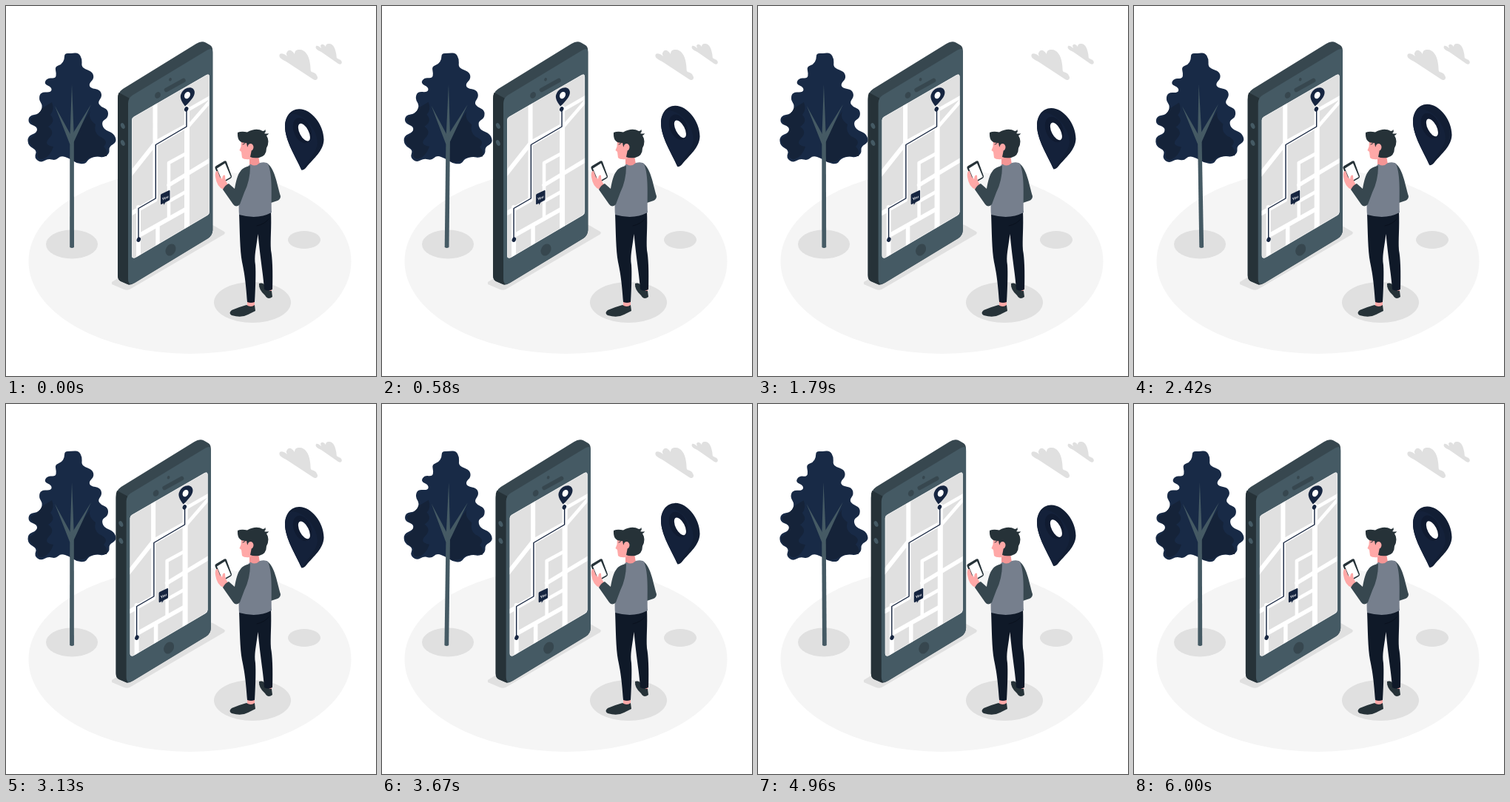
These frames come from a looping animation (500x500 px, 6040 ms). An HTML page with a canvas:

```html
<!DOCTYPE html>
<html lang="en">
<head>
<meta charset="utf-8">
<title>Navigation</title>
<style>
html, body { margin: 0; width: 100%; height: 100%; overflow: hidden; background: #fff; }
canvas { display: block; width: 500px; height: 500px; }
</style>
</head>
<body>
<canvas id="stage"></canvas>
<script>
const canvas = document.getElementById('stage');
const ctx = canvas.getContext('2d');
const ratio = window.devicePixelRatio || 1;
canvas.width = canvas.height = 500 * ratio;

const LOOP = 6040;
const NAVY = '#162540', SLATE = '#455a64', STEEL = '#37474f', INK = '#263238';
const GREY = '#e0e0e0', SKIN = '#ffa8a7';

function fill(d, color) {
  ctx.fillStyle = color;
  ctx.fill(new Path2D(d));
}

function line(d, color, width) {
  ctx.strokeStyle = color;
  ctx.lineWidth = width;
  ctx.stroke(new Path2D(d));
}

function oval(x, y, rx, ry, color, turn = 0) {
  ctx.fillStyle = color;
  ctx.beginPath();
  ctx.ellipse(x, y, rx, ry, turn, 0, Math.PI * 2);
  ctx.fill();
}

// Closed smooth outline through the midpoints of a flat x, y list.
function blob(p, color) {
  const n = p.length / 2;
  const at = i => [p[(i % n) * 2], p[(i % n) * 2 + 1]];
  const mid = i => {
    const a = at(i), b = at(i + 1);
    return [(a[0] + b[0]) / 2, (a[1] + b[1]) / 2];
  };
  ctx.fillStyle = color;
  ctx.beginPath();
  ctx.moveTo(...mid(0));
  for (let i = 1; i <= n; i++) ctx.quadraticCurveTo(...at(i), ...mid(i));
  ctx.fill();
}

// cubic-bezier(.42, 0, 1, 1)
function easeIn(x) {
  let lo = 0, hi = 1;
  for (let i = 0; i < 24; i++) {
    const t = (lo + hi) / 2, u = 1 - t;
    if (1.26 * u * u * t + 3 * u * t * t + t * t * t < x) lo = t; else hi = t;
  }
  return 3 * lo * lo - 2 * lo * lo * lo;
}

// Keys are [position, value] pairs; easing restarts on every segment.
function tween(keys, p) {
  let i = 1;
  while (i < keys.length - 1 && p > keys[i][0]) i++;
  const [a, from] = keys[i - 1], [b, to] = keys[i];
  return from + (to - from) * easeIn((p - a) / (b - a));
}

const SWAY = [[0, 0], [.25, 1], [.75, -1], [1, 0]];
const HOVER = [[0, -.3], [.5, -7.1], [1, -.3]];
const SHAKE = [0, -1, 2, -2.7, 2.7, -2.7, 2.7, -2.7, 2, -1, 0].map((v, i) => [i / 10, v]);

const CROWN = [
  79, 72, 79, 64, 88, 64, 98, 63, 103, 72, 102, 81, 106, 85, 117, 89, 119, 98,
  112, 105, 114, 111, 127, 113, 130, 122, 124, 130, 128, 136, 138, 140, 138, 151,
  129, 156, 132, 167, 146, 172, 150, 184, 139, 190, 140, 199, 132, 205, 123, 203,
  112, 206, 107, 214, 94, 212, 86, 206, 74, 202, 67, 209, 57, 206, 47, 212, 38, 205,
  42, 195, 30, 189, 29, 176, 42, 171, 42, 163, 30, 159, 31, 148, 45, 146, 50, 135,
  44, 126, 47, 116, 61, 117, 62, 110, 51, 105, 56, 97, 67, 98, 68, 91, 66, 82, 75, 79
];

function drawGround() {
  oval(248.5, 345.2, 218, 124.7, '#f5f5f5');
  oval(89, 322, 35, 19.5, GREY);
  oval(333, 400.5, 52, 27.5, GREY);
  oval(403, 316, 22, 12, GREY);
  fill('M143 373 L270 296 Q276 293 283 298 L295 305 Q297 307 294 309 L167 383 Q162 385 157 382 L143 376Z', GREY);
}

function drawClouds() {
  fill('M370 65 C367 70 375 73 380 76 L415 99 C419 102 423 98 420 94 C419 91 416 90 413 89 C411 88 412 85 411 79 C410 66 403 58 396 59 C392 59 390 61 390 65 C387 60 382 58 380 62 C378 64 379 66 380 68 C377 65 372 63 370 65Z', GREY);
  fill('M419 54 C417 58 422 60 426 62 L449 78 C453 80 455 77 453 74 C452 72 449 72 448 71 C446 70 447 67 446 64 C445 56 441 50 436 51 C433 51 432 53 432 55 C429 51 426 51 425 54 L426 57 C423 54 420 53 419 54Z', GREY);
}

function drawTree(deg) {
  ctx.save();
  ctx.translate(89, 195);
  ctx.rotate(deg * Math.PI / 180);
  ctx.translate(-89, -195);
  blob(CROWN, '#182a46');
  const shade = '#152339';
  fill('M62 130 Q66 140 60 147 Q68 156 57 163 Q67 170 58 179 Q50 188 64 190 Q60 203 50 207 Q40 208 43 196 Q31 188 31 180 Q42 174 43 164 Q33 160 33 152 Q45 147 49 138Z', shade);
  fill('M89 185 Q98 165 114 142 Q110 152 121 160 Q118 170 126 176 Q140 182 132 190 Q138 196 136 203 Q126 202 112 205 Q108 211 95 211 L88 207Z', shade);
  fill('M89 106 L91.8 176 L92 326 Q89 328 86.2 326 L86.3 180Z', SLATE);
  fill('M66 135 L89 177 L91 190 L86 186Z M115 133 L88 176 L87 190 L92 183Z', SLATE);
  ctx.restore();
}

function drawMap() {
  const screen = 'M170 154 Q170 151 173 149.4 L271 93 Q275 91 275 96 V278 Q275 281 272 283 L175 340 Q170 342 170 337Z';
  fill(screen, GREY);
  ctx.save();
  ctx.clip(new Path2D(screen));
  line('M201.5 120 V262 L170 280 M179 272 V338 M168 228 L202 185 L244 162', '#fff', 6);
  line('M244.5 138 V310', '#fff', 7);
  line('M180 310 L244 274 M205 296 V324 M220 242 L278 207', '#fff', 5.5);
  line('M220 288 V212 L242 200 M220 264 L243 251', '#fff', 4.5);
  line('M245 141 L278 122 M246 163 L278 126', '#fff', 4.5);
  line(screen, '#f5f5f5', 1.2);
  ctx.restore();

  const route = 'M179 316 V273.5 L202.3 260 V187.5 L244 163 V139';
  line(route, '#fff', 4.5);
  line(route, NAVY, 1.4);
  oval(179.3, 315.7, 2.6, 3.4, NAVY, .4);
  oval(243.7, 139.3, 2.6, 3.4, NAVY, .4);

  fill('M242 135.5 C237 129 234 123 237 118 C240 111 249 108 253 112 C257 116 254 123 250 127 Q246 132 242 135.5Z', NAVY);
  oval(245, 120.6, 3.7, 4.9, '#fff', .5);

  fill('M209 256 Q209 254.5 210 254 L220.5 249 Q221.5 248.5 221.5 250 V261 Q221.5 262.5 220 263 L215.5 265.2 L213 269 V266.5 L210.3 268 Q209 268.5 209 267Z', NAVY);
  ctx.save();
  ctx.transform(1, -.48, 0, 1, 215.3, 261);
  ctx.fillStyle = '#fff';
  ctx.font = 'bold 5px Lato, sans-serif';
  ctx.textAlign = 'center';
  ctx.fillText('You', 0, 0);
  ctx.restore();
}

function drawPhone(dx) {
  ctx.save();
  ctx.translate(dx, 0);
  fill('M151 127 Q151 116.5 158 112 L257 51 Q264 46.5 270 49.5 L276 53 Q279.3 55 279.3 61 V303 Q279 310 273 314 L174 374 Q168 378 164 376 L155 372 Q151 370 151 364Z', STEEL);
  fill('M152.5 117 L166.5 124.5 V376.8 L155 372 Q151 370 151 364 V125 Q151 120 152.5 117Z', INK);
  fill('M165 131.5 Q165 124.5 171 120.5 L272 59.5 Q279.3 55 279.3 63 V303 Q279 310 273 314 L174 374 Q165 378.5 165 369Z', SLATE);
  oval(157.8, 162, 2.6, 4.2, SLATE, -.4);
  oval(157.8, 185, 2.6, 4.2, SLATE, -.4);
  oval(205, 120.5, 3.7, 4.6, STEEL, .5);
  oval(222, 99.3, 1.8, 2.2, STEEL, .5);
  line('M216.5 113.5 L240 100.5', STEEL, 5.5);
  oval(222.5, 329.5, 6.5, 8.5, STEEL, .5);
  drawMap();
  ctx.restore();
}

function drawPin(dy) {
  ctx.save();
  ctx.translate(0, dy);
  fill('M399.5 222 C392 205 377 182 377 163 C377 150 384 140 396 139.5 C412 139 429.5 160 429.5 181 C429 196 416 206 406 218 Q403 222 399.5 222Z', '#121e34');
  fill('M399.5 222 C392 205 377 182 377 163 C377 153 382 145 389 146 C405 148 421 168 421 186 C420 197 410 207 399.5 222Z', '#14213a');
  oval(400.5, 168.5, 11.5, 18, '#101b31', -.4);
  oval(402.9, 171, 6, 13, '#fff', -.48);
  ctx.restore();
}

function drawMan() {
  fill('M326 399 H336 V406 Q331 410 326 406Z M349 382 L359 381 V387 Q354 391 350 386Z', SKIN);
  fill('M325 404 Q314 407 305 411 Q300 415 305 418 Q318 422 327 417 L337 412 L336 404 Q331 408 325 404Z', INK);
  fill('M342 375 Q348 373 351 380 Q354 385 359 385 L360 393 Q354 398 350 391 Q341 383 342 375Z', INK);
  fill('M315 280 L358 277 C359 300 357 315 358 330 Q361 345 360 383 Q354 386 349 383 C348 365 344 345 340.5 308 C338 328 335 338 337 350 Q338 365 336 400 Q331 402 326 400 C324 372 322 360 319 346 C316 330 316 305 315 280Z', '#0f1928');
  line('M339 297 Q349 295 355 288', '#0a111e', 1);

  fill('M352 212 C363 218 366 240 371 257 Q371 261 367 263 L358 266 L355 240Z', STEEL);
  fill('M329 200 L341 202 L343 214 Q335 220 329 214Z', '#f49595');
  fill('M327 217 Q330 213 331 214 Q337 218 343 212 Q350 210 354 213 C361 230 358 260 359 279 Q340 289 315 282 C314 260 316 240 318 235Z', '#767f8d');

  fill('M282.5 219 Q282 217 284 216 L295 209.5 Q297 208.5 298 210.5 L305 230 Q305.3 232 303.5 233 L294 238.5 Q291 239.5 290 237Z', INK);
  fill('M285 219.4 L296 212.5 L303.8 231 L292.5 237.5Z', '#fff');
  fill('M283 231 Q282 222 286 223 L289 231 L292 234 Q293 227 296 229 Q296 237 300 241 L294 248 Q285 245 283 231Z', SKIN);
  fill('M330 216 C318 218 313 224 309 247 L301 240 Q296 242 293 248 L307 268 Q311 273 316 268 L322 252 Q330 236 330 216Z', STEEL);

  fill('M318 181 L317.5 190 L315.5 195 L318 197 L319 205 Q322 208 330 207 L338 200 L336 182Z', SKIN);
  fill('M313 171 Q318 169 326 170.5 Q338 164 347 169 Q350 169 350 166.5 Q352 170 349 172 Q352 173 355 172 Q354 175 352 175 Q357 183 352 192 Q352 203 342 205 Q334 206 330 204 L332 194 L326 190 L325 185 Q312 186 313 171Z', INK);
  oval(330.5, 190.8, 4, 4.8, SKIN);
  line('M320 187 L323 185.6', INK, 1);
}

function draw(now) {
  const p = (now % LOOP) / LOOP;
  ctx.setTransform(ratio, 0, 0, ratio, 0, 0);
  ctx.lineCap = 'round';
  ctx.lineJoin = 'round';
  ctx.fillStyle = '#fff';
  ctx.fillRect(0, 0, 500, 500);
  drawGround();
  drawClouds();
  drawTree(tween(SWAY, p * 2 % 1));
  drawPhone(tween(SHAKE, p));
  drawPin(tween(HOVER, p * 4 % 1));
  drawMan();
}

const start = performance.now();
function tick() {
  draw(performance.now() - start);
  requestAnimationFrame(tick);
}
tick();
</script>
</body>
</html>
```
